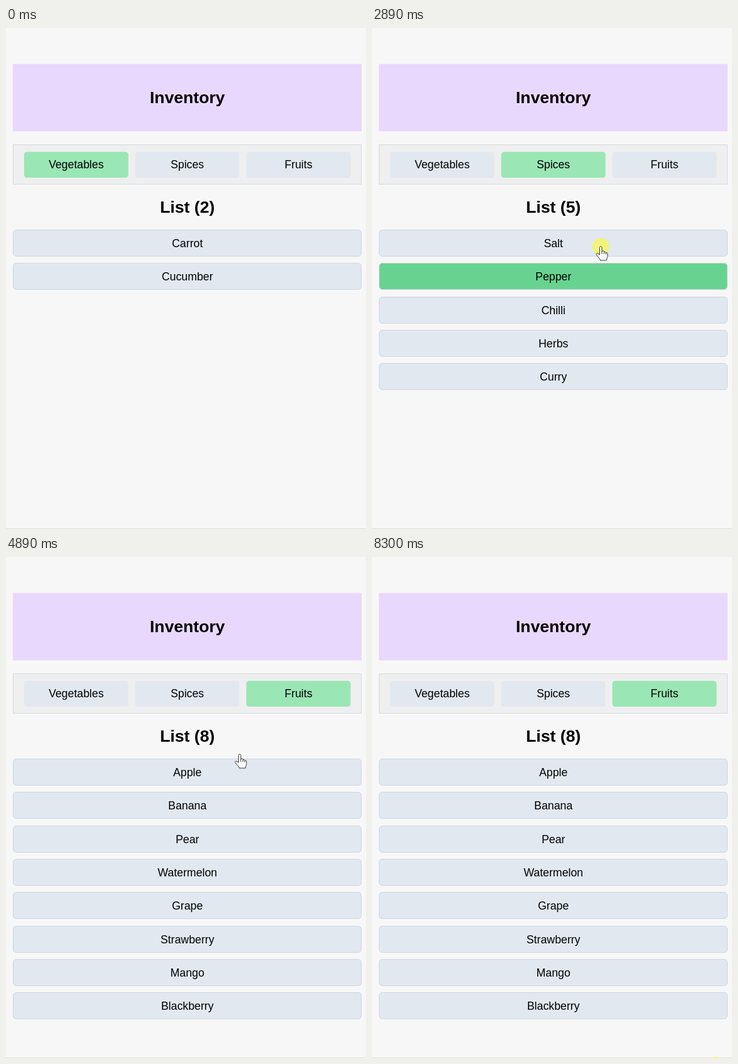
An HTML page that plays this animation: 575 by 800 pixels, repeating every 8370 ms.

```html
<!DOCTYPE html>
<html lang="en">
<head>
<meta charset="utf-8">
<title>Inventory</title>
<style>
  html, body { margin: 0; width: 100%; height: 100%; overflow: hidden; background: #f7f7f7; }
  svg { display: block; width: 100vw; height: 100vh; }
  text { font: 17.78px Arial, "Liberation Sans", sans-serif; text-anchor: middle; fill: #000; }
  .title { font-size: 26.67px; font-weight: bold; }
</style>
</head>
<body>
<svg id="stage" viewBox="0 0 575 800"></svg>
<script>
const LOOP = 8370, PRESS = 130, SETTLE = 40;
const GREY = '#e2e8f0', GREEN = '#68d391', ACTIVE = '#9ae6b4', LINE = '#cbd5e0';
const LEFT = 11, WIDTH = 557, MID = 289.7, PITCH = 160 / 3;

// Each tab opens at `opens`; its rows are then toggled in order, at a quickening pace.
const TABS = [
  { name: 'Vegetables', opens: 0, items: ['Carrot', 'Cucumber'],
    order: [0, 1, 0, 1], first: 420, gap: 390, pace: .9, x: 330, drift: -10 },
  { name: 'Spices', opens: 2120, items: ['Salt', 'Pepper', 'Chilli', 'Herbs', 'Curry'],
    order: [1, 0, 2, 0, 1, 2], first: 2612, gap: 401, pace: .9, x: 373, drift: -7.6 },
  { name: 'Fruits', opens: 4600,
    items: ['Apple', 'Banana', 'Pear', 'Watermelon', 'Grape', 'Strawberry', 'Mango', 'Blackberry'],
    order: [0, 3, 0, 3], first: 5200, gap: 723, pace: .62, x: 328, drift: 8.4 }
];
const tabLeft = i => 28.9 + i * 177.5;

const clicks = TABS.flatMap((tab, i) => {
  const list = i ? [{ time: tab.opens, x: tabLeft(i) + 128, y: 211 }] : [];
  let time = tab.first, gap = tab.gap;
  tab.order.forEach((row, k) => {
    list.push({ time, row, tab: i, x: tab.x + k * tab.drift, y: 349 + row * 51.6 });
    time += gap;
    gap *= tab.pace;
  });
  return list;
});

// Pointer stops: rest around every click, plus the way in, one detour and the way out
const path = [
  [70, 410, 350], [1780, 387, 236], [6980, 457, 222], [7200, 530, 171], [7750, 545, 684], [8030, 541, 764],
  ...clicks.flatMap(c => [[c.time - PRESS - SETTLE, c.x, c.y], [c.time, c.x, c.y]])
].sort((a, b) => a[0] - b[0]);

const stage = document.getElementById('stage');

function set(el, attrs) {
  for (const k in attrs) el.setAttribute(k, attrs[k]);
}
function add(tag, attrs, content = '', parent = stage) {
  const el = document.createElementNS('http://www.w3.org/2000/svg', tag);
  set(el, attrs);
  if (content) el.textContent = content;
  return parent.appendChild(el);
}
function show(el, on) {
  el.setAttribute('visibility', on ? 'visible' : 'hidden');
}
// Box whose 1px border lies inside the given bounds
function framed(y, height, attrs, parent) {
  return add('rect', { x: LEFT + .5, y: y + .5, width: WIDTH - 1, height: height - 1, ...attrs }, '', parent);
}

add('rect', { width: 575, height: 800, fill: '#f7f7f7' });
add('rect', { x: LEFT, y: 57.5, width: WIDTH, height: 107.5, fill: '#e9d8fd' });
add('text', { x: MID, y: 120, class: 'title' }, 'Inventory');
framed(186, 64, { fill: '#efefef', stroke: '#d3d9df' });
add('rect', { y: 799, width: 575, height: 1, fill: '#dedede' });

const tabBoxes = TABS.map(({ name }, i) => {
  const box = add('rect', { x: tabLeft(i), y: 197.7, width: 166.5, height: 41.3, rx: 4.5 });
  add('text', { x: tabLeft(i) + 83.2, y: 224.3 }, name);
  return box;
});
const count = add('text', { x: MID, y: 295, class: 'title' });

const rows = TABS[2].items.map((_, i) => {
  const y = Math.round(322 + i * PITCH);
  const group = add('g', {});
  const box = framed(y, 43, { rx: 5, stroke: LINE }, group);
  const label = add('text', { x: MID, y: y + 28 }, '', group);
  return { group, box, label };
});

const halo = add('circle', { r: 13.5, fill: '#ff0', 'fill-opacity': .5 });
const hand = add('g', { fill: '#fff', stroke: '#333', 'stroke-linejoin': 'round' });
add('path', { d: 'M-1.8 13V1.6A1.8 1.8 0 0 1 1.8 1.6V8.2A1.7 1.7 0 0 1 5.2 8.6V9.3A1.6 1.6 0 0 1 8.2 9.8V10.4A1.4 1.4 0 0 1 10.8 11V15.5C10.8 17.5 9.5 18.5 9.2 22H-.5C-1 19.5-4 17-7 13.2C-8.2 11.5-6 10-4.3 11.3Z' }, '', hand);
add('path', { d: 'M1.8 8V12M5.2 9V12M8.2 10V12.5', fill: 'none' }, '', hand);

function pointerAt(t) {
  const next = path.findIndex(p => p[0] > t);
  if (next < 1) return (next ? path[path.length - 1] : path[0]).slice(1);
  const [t0, x0, y0] = path[next - 1], [t1, x1, y1] = path[next];
  const u = (t - t0) / (t1 - t0);
  const e = u * u * (3 - 2 * u);
  return [x0 + (x1 - x0) * e, y0 + (y1 - y0) * e];
}

function draw(t) {
  const current = TABS.filter(tab => t >= tab.opens).length - 1;
  const { items } = TABS[current];

  tabBoxes.forEach((box, i) => set(box, { fill: i === current ? ACTIVE : GREY }));
  count.textContent = `List (${items.length})`;
  rows.forEach(({ group, box, label }, i) => {
    const toggles = clicks.filter(c => c.tab === current && c.row === i && c.time <= t).length;
    show(group, i < items.length);
    label.textContent = items[i] || '';
    set(box, { fill: toggles % 2 ? GREEN : GREY });
  });

  const [x, y] = pointerAt(t);
  const leaving = t >= 8300;
  const pressed = clicks.some(c => t >= c.time - PRESS && t < c.time);
  set(hand, { transform: `translate(${x} ${y})` });
  show(hand, t >= 70 && t < 8030);
  set(halo, leaving ? { cx: 548, cy: 811.5 } : { cx: x, cy: y });
  show(halo, pressed || leaving);
}

const start = performance.now();
function tick() {
  draw((performance.now() - start) % LOOP);
  requestAnimationFrame(tick);
}
tick();
</script>
</body>
</html>
```
